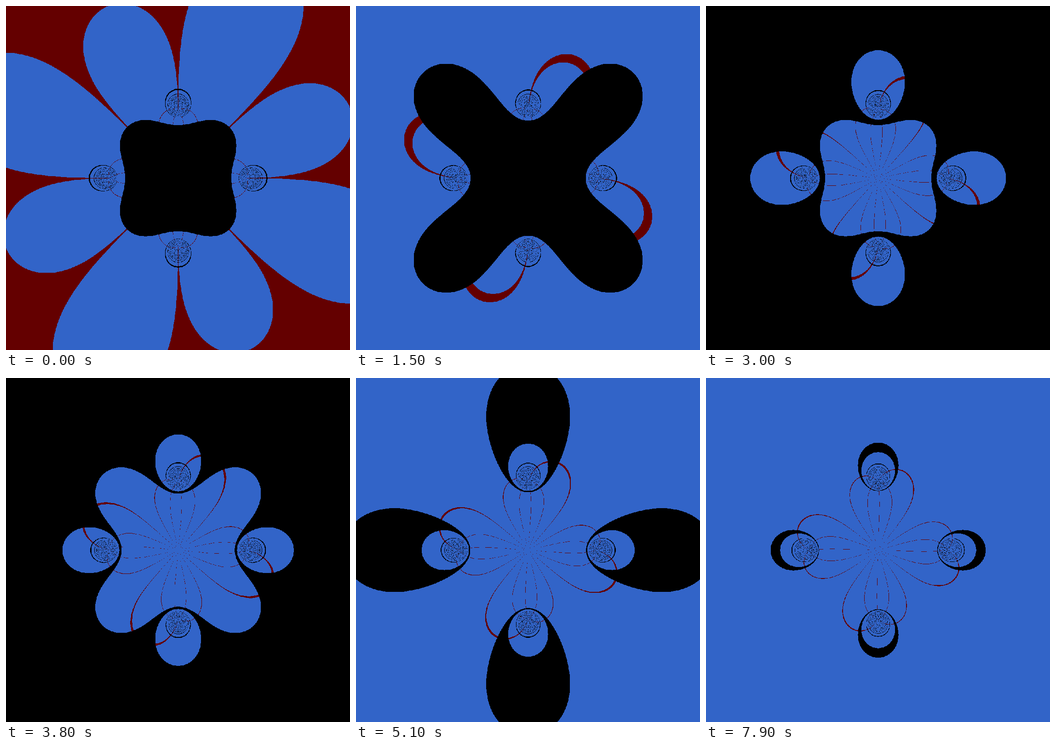
Animation, 748 px wide and 748 px high, one loop 8000 ms. Source, as an HTML page with a canvas:

```html
<!DOCTYPE html>
<html>
<head>
<meta charset="utf-8">
<style>
html, body { margin: 0; width: 100%; height: 100%; overflow: hidden; background: #3264c8; }
canvas { display: block; }
</style>
</head>
<body>
<canvas id="stage" width="748" height="748"></canvas>
<script>
const SIZE = 748, GRID = 1000, SPAN = 5;
const STEP_MS = 100, STEPS = 80, PERIOD = 10;
const ctx = document.getElementById('stage').getContext('2d');
const image = ctx.createImageData(SIZE, SIZE);
const pixels = new Uint32Array(image.data.buffer);
const modulus = new Float64Array(SIZE * SIZE);
const angle = new Float64Array(SIZE * SIZE);

const rgb = (r, g, b) => (255 << 24 | b << 16 | g << 8 | r) >>> 0;
const BLACK = rgb(0, 0, 0), RED = rgb(100, 0, 0), BLUE = rgb(50, 100, 200);
const wrap = v => v - PERIOD * Math.floor(v / PERIOD);

// The plane is sampled on a GRID x GRID lattice, shown by nearest neighbour.
const coord = i => (Math.floor((i + 0.5) * GRID / SIZE) - GRID / 2) * SPAN / GRID;

// Polar form of f(z) = (z^4 / (z^4 - 1))^5, the angle measured in tenths of a turn.
for (let row = 0, i = 0; row < SIZE; row++) {
  const y = -coord(row);
  for (let col = 0; col < SIZE; col++, i++) {
    const x = coord(col);
    const a = x * x - y * y, b = 2 * x * y;
    const u = a * a - b * b, v = 2 * a * b;
    modulus[i] = ((u * u + v * v) / ((u - 1) * (u - 1) + v * v)) ** 2.5;
    angle[i] = 5 * (Math.atan2(v, u) - Math.atan2(v, u - 1)) * PERIOD / (2 * Math.PI);
  }
}

function draw(step) {
  const shift = step * 0.05;
  for (let i = 0; i < pixels.length; i++) {
    pixels[i] = wrap(modulus[i] - shift) >= 8.5 ? BLACK
      : wrap(angle[i] - shift) >= 9.8 ? RED : BLUE;
  }
  ctx.putImageData(image, 0, 0);
}

const start = performance.now();
let shown = 0;
function tick() {
  const elapsed = performance.now() - start;
  const step = Math.floor(elapsed / STEP_MS) % STEPS + 1;
  if (step !== shown) draw(shown = step);
  requestAnimationFrame(tick);
}
tick();
</script>
</body>
</html>
```
